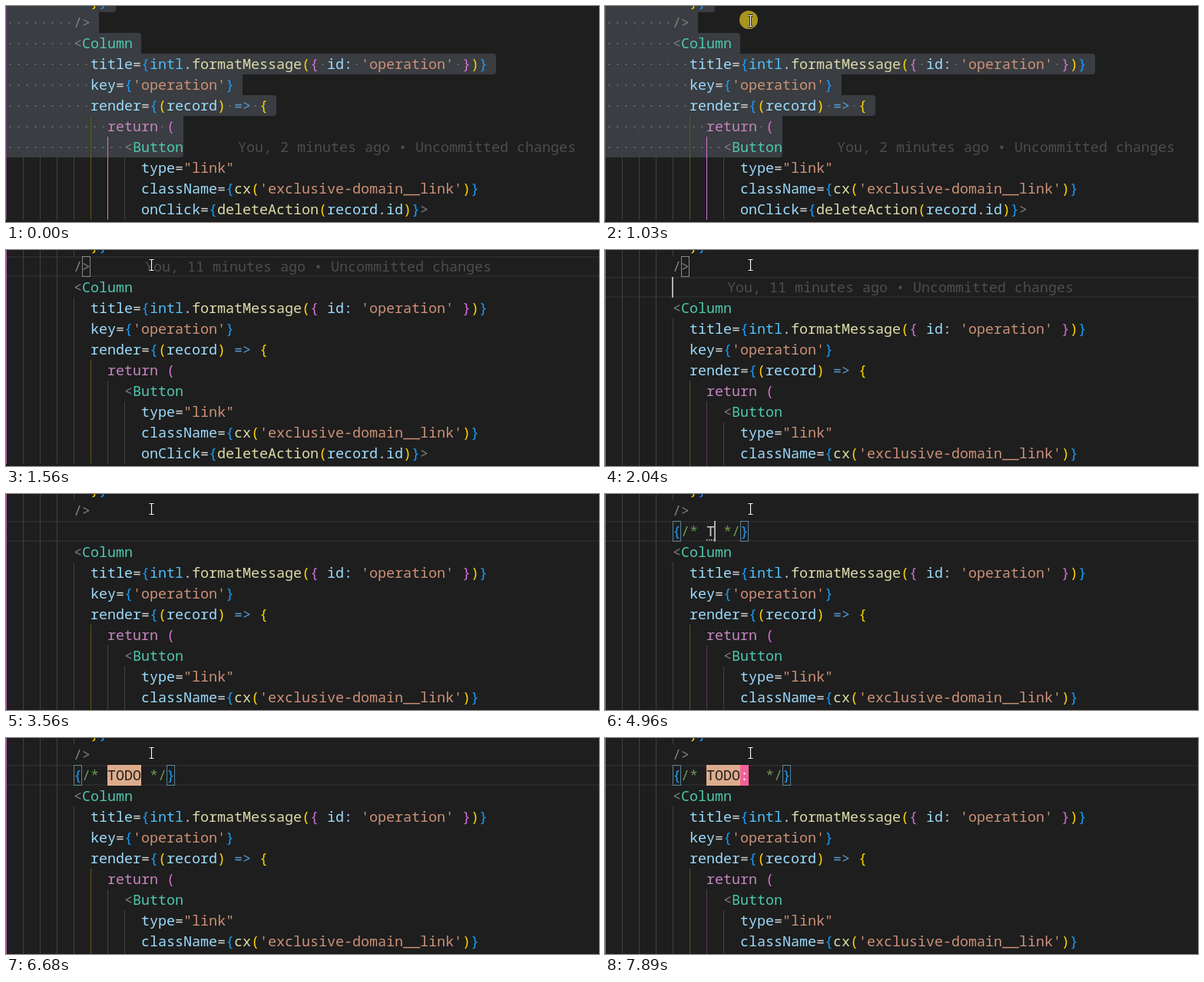
Recreate the animation shown at these times as an HTML page with a canvas. Size 772 by 281 pixels, loop 8000 ms.

```html
<!DOCTYPE html>
<html lang="en">
<head>
<meta charset="utf-8">
<title>Editor: adding a TODO comment</title>
<style>
  html, body { margin: 0; width: 100%; height: 100%; overflow: hidden; background: #1e1e1e; }
  canvas { display: block; }
</style>
</head>
<body>
<canvas id="stage" width="772" height="281"></canvas>
<script>
const ctx = document.getElementById('stage').getContext('2d');
const LOOP = 8000, CHAR = 11, ROW = 27, TOP = 8;
const CODE_FONT = '18.333px "Noto Sans Mono", monospace';
const UI_FONT = '15px "Open Sans", sans-serif';

const gray = '#808080', teal = '#4ec9b0', attr = '#9cdcfe', plain = '#d4d4d4',
  blue = '#179fff', gold = '#ffd700', orchid = '#da70d6', constant = '#4fc1ff',
  func = '#dcdcaa', string = '#ce9178', keyword = '#c586c0', arrow = '#569cd6',
  comment = '#6a9955', guide = '#404040', peach = '#deac8c', pink = '#f5609a';

// Each line: indent, then text and colour by turns.
const code = [
  [10, '}', gold, '}', blue],
  [8, '/>', gray],
  [8, '<', gray, 'Column', teal],
  [10, 'title', attr, '=', plain, '{', blue, 'intl', constant, '.', plain, 'formatMessage', func,
    '(', gold, '{', orchid, ' id:', attr, " 'operation' ", string, '}', orchid, ')', gold, '}', blue],
  [10, 'key', attr, '=', plain, '{', blue, "'operation'", string, '}', blue],
  [10, 'render', attr, '=', plain, '{', blue, '(', gold, 'record', attr, ')', gold, ' => ', arrow, '{', gold],
  [12, 'return ', keyword, '(', orchid],
  [14, '<', gray, 'Button', teal],
  [16, 'type', attr, '=', plain, '"link"', string],
  [16, 'className', attr, '=', plain, '{', blue, 'cx', func, '(', gold,
    "'exclusive-domain__link'", string, ')', gold, '}', blue],
  [16, 'onClick', attr, '=', plain, '{', blue, 'deleteAction', func, '(', gold, 'record', attr,
    '.', plain, 'id', attr, ')', gold, '}', blue, '>', gray],
];

const rowTop = row => TOP + row * ROW;
const lineText = ([indent, ...parts]) => ' '.repeat(indent) + parts.filter((_, i) => i % 2 === 0).join('');

// Latest value whose start time has passed.
const valueAt = (t, steps, initial) => steps.reduce((v, [start, next]) => t >= start ? next : v, initial);

function rect(x, y, w, h, color) {
  ctx.fillStyle = color;
  ctx.fillRect(x, y, w, h);
}

function rounded(x, y, w, h, radius, color) {
  ctx.fillStyle = color;
  ctx.beginPath();
  ctx.roundRect(x, y, w, h, radius);
  ctx.fill();
}

function text(str, x, y, color, font = CODE_FONT) {
  ctx.font = font;
  ctx.fillStyle = color;
  ctx.fillText(str, x, y);
}

function drawLine([indent, ...parts], row) {
  let col = indent;
  for (let i = 0; i < parts.length; i += 2) {
    text(parts[i], col * CHAR, rowTop(row) + 20, parts[i + 1]);
    col += parts[i].length;
  }
}

function drawGuides(indent, row, selected) {
  const colors = { 0: selected ? '#6b416b' : '#b45fb1', 10: '#615614', 12: selected ? orchid : '#563755' };
  for (let col = 0; col < indent; col += 2)
    rect(col * CHAR, rowTop(row), 1, ROW, colors[col] || guide);
}

function drawSelection() {
  const lines = code.slice(0, 8).map(lineText);
  const widths = lines.map((line, i) => (line.length + (i < 7 ? 1 : 0)) * CHAR);
  widths.forEach((w, i) => rounded(0, rowTop(i - 1), w, ROW,
    [0, widths[i - 1] < w ? 4 : 0, widths[i + 1] >= w ? 0 : 4, 0], '#3a3d41'));
  lines.forEach((line, i) => [...line].forEach((ch, col) => {
    if (ch === ' ') rect(col * CHAR + 4.5, rowTop(i - 1) + 13, 2, 2, '#65686b');
  }));
}

function bracketBox(col, row, color) {
  ctx.strokeStyle = color;
  ctx.lineWidth = 1;
  ctx.strokeRect(col * CHAR + .5, rowTop(row) + .5, CHAR - 1, ROW - 1);
}

function blame(age, col, row) {
  text(`You, ${age} minutes ago • Uncommitted changes`, col * CHAR + 71, rowTop(row) + 20, '#4d4d4d');
}

function drawComment(t, typed) {
  const y = rowTop(1), end = 12 + typed.length;
  const composing = t >= 4960 && t < 6080, marked = t >= 6280;
  if (marked) {
    rect(132, y, (t < 7890 ? typed.length : 4) * CHAR, ROW, peach);
    if (t >= 7890) rect(176, y, CHAR, ROW, pink);
  }
  drawLine([8, '{', blue, '/* ', comment], 1);
  text(typed.slice(0, 4), 132, y + 20, marked ? '#1e1e1e' : composing ? plain : comment);
  text(typed.slice(4), 176, y + 20, t >= 7890 ? '#fff' : '#1e1e1e');
  drawLine([end, ' */', comment, '}', blue], 1);
  bracketBox(8, 1, '#5c8194');
  bracketBox(end + 3, 1, '#5c8194');
  if (composing)
    for (let x = 132; x < end * CHAR; x += 3) rect(x, y + 24, 1.5, 1.5, '#c8c8c8');
}

function triangle(x, y, dir) {
  ctx.fillStyle = '#666';
  ctx.beginPath();
  ctx.moveTo(x + 4 * dir, y);
  ctx.lineTo(x - 3 * dir, y - 5);
  ctx.lineTo(x - 3 * dir, y + 5);
  ctx.fill();
}

function drawCandidates(word) {
  const shift = (word.length - 4) * 12;
  ctx.save();
  ctx.shadowColor = 'rgba(0,0,0,.5)';
  ctx.shadowBlur = 12;
  ctx.shadowOffsetY = 3;
  rounded(134, 61, 181 + shift, 34, 7, '#2b2b2b');
  ctx.restore();
  rounded(137, 65, 74 + shift, 26, 4, '#383838');
  rounded(137, 70, 3, 16, 1.5, '#4cc2ff');
  text('1', 148, 83, '#fff', UI_FONT);
  text(word, 160, 83, '#fff', UI_FONT);
  triangle(233 + shift, 78, -1);
  triangle(263 + shift, 78, 1);
  ctx.strokeStyle = '#fff';
  ctx.lineWidth = 1.5;
  ctx.beginPath();
  ctx.roundRect(292 + shift, 72, 12, 12, 2);
  ctx.stroke();
  rect(297 + shift, 69, 9, 9, '#2b2b2b');
  text('♥', 296 + shift, 79, '#fff', '13px "DejaVu Sans", sans-serif');
}

function drawPointer(t) {
  if (t < 490) return;
  const p = Math.min(Math.floor((t - 490) / 70) / 4, 1), rest = (1 - p) ** 1.5;
  const x = Math.round(189 + 148 * rest), y = Math.round(19 + 115 * rest);
  if (t >= 1030 && t < 1160) {
    ctx.fillStyle = '#a8941c';
    ctx.beginPath();
    ctx.arc(x - 2, y - 1, 12, 0, 7);
    ctx.fill();
  }
  for (const [width, color] of [[3, '#111'], [1.2, '#fff']]) {
    ctx.strokeStyle = color;
    ctx.lineWidth = width;
    ctx.beginPath();
    for (const end of [-1, 1]) {
      ctx.moveTo(x - 2.5, y + .5 + 7 * end);
      ctx.lineTo(x + 3.5, y + .5 + 7 * end);
    }
    ctx.moveTo(x + .5, y - 6.5);
    ctx.lineTo(x + .5, y + 7.5);
    ctx.stroke();
  }
}

function draw(t) {
  const selected = t < 1100, inserted = t >= 2040, commented = t >= 4020;
  const typed = valueAt(t, [[4960, 'T'], [5090, 'TO'], [5220, 'TOD'], [5620, 'TODO'],
    [6960, 'TODO:'], [7360, 'TODO: ']], '');
  const caretRow = inserted ? 1 : 0;
  const caretCol = commented ? 12 + typed.length : inserted ? 8 : 10;
  const caretOn = valueAt(t, [[1100, true], [1560, false], [2040, true], [2570, false], [3030, true],
    [3560, false], [4020, true], [4480, false], [4960, true], [6680, false], [6960, true], [7890, false]], false);

  rect(0, 0, 772, 281, '#1e1e1e');
  if (selected) {
    drawSelection();
  } else {
    rect(0, rowTop(caretRow), 772, 2, '#2a2a2a');
    rect(0, rowTop(caretRow) + ROW - 2, 772, 2, '#2a2a2a');
  }

  code.forEach((line, i) => {
    const row = i - 1 + (inserted && i > 1 ? 1 : 0);
    drawGuides(line[0], row, selected);
    drawLine(line, row);
  });
  if (inserted) drawGuides(8, 1, false);
  if (commented) drawComment(t, typed);

  if (selected) blame(2, 21, 6);
  if (t >= 1360 && t < 2110) blame(11, caretCol, caretRow);
  if (t >= 1100 && t < 2110) bracketBox(9, 0, '#888');
  if (caretOn) rect(caretCol * CHAR - 1, rowTop(caretRow), 2, ROW, '#aeafad');
  if (t >= 5220 && t < 6080) drawCandidates(t < 5750 ? 'TOD' : 'TODO');
  drawPointer(t);
}

function tick() {
  draw(performance.now() % LOOP);
  requestAnimationFrame(tick);
}
tick();
</script>
</body>
</html>
```
